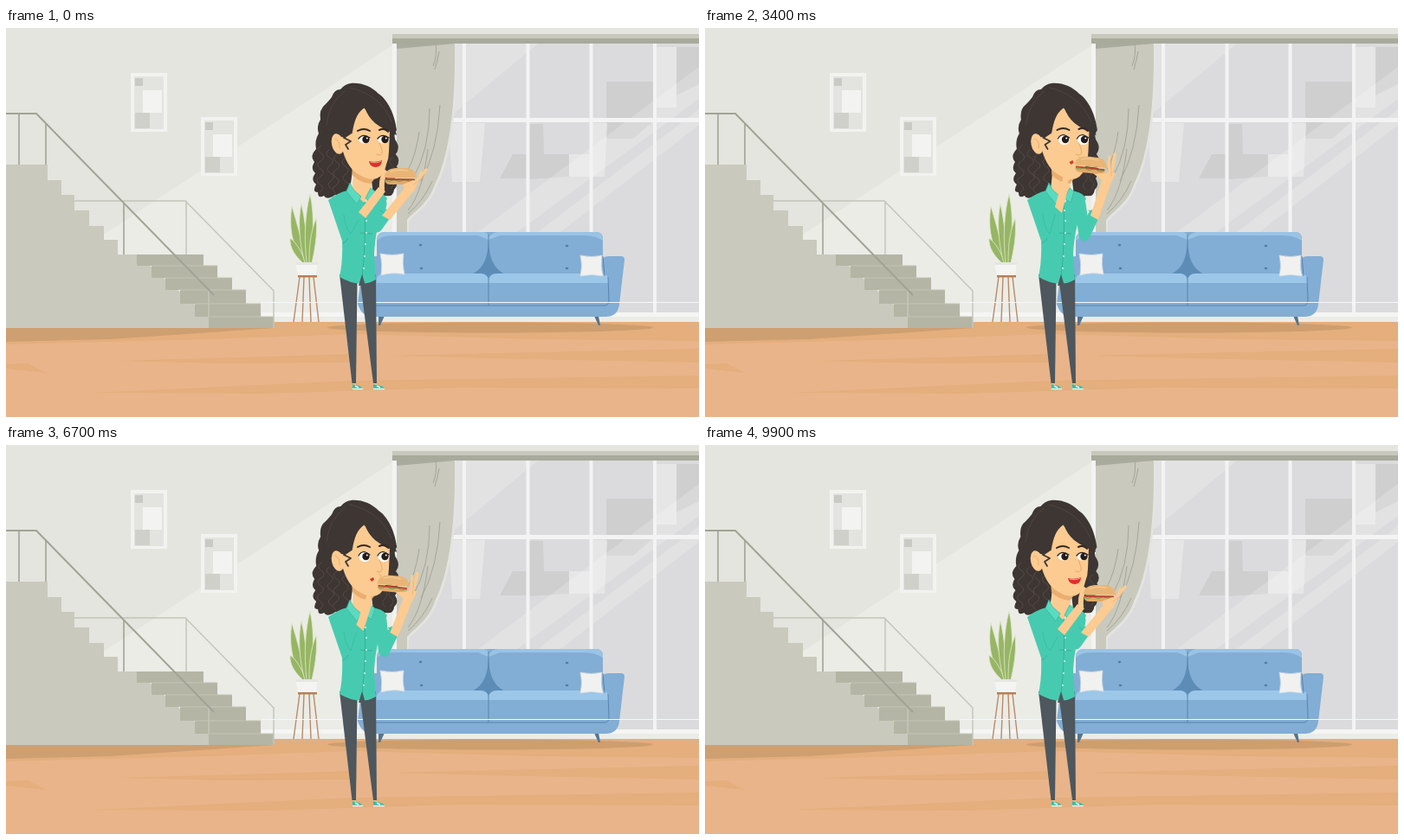
These frames come from a looping animation (800 px wide and 450 px high, 10000 ms). An HTML page:

```html
<!DOCTYPE html>
<html lang="en">
<head>
<meta charset="utf-8">
<title>Lunch at home</title>
<style>
html,body{margin:0;width:100%;height:100%;overflow:hidden;background:#e4e5de}
svg{display:block;width:100vw;height:100vh}
</style>
</head>
<body>
<svg viewBox="0 0 800 450">
  <defs>
    <g id="picture">
      <path fill="#f2f3f0" d="M0 0h42v68h-42z"/><path fill="#e3e4df" d="M4 4h34v61h-34z"/>
      <path fill="#c9cac4" d="M5 6h9v9h-9z"/><path fill="#cfd0ca" d="M5 46h17v18h-17z"/>
      <path fill="#f3f4f1" d="M14 20h22v26h-22z"/>
    </g>
    <clipPath id="glass"><path d="M451 18H800V329H451z"/></clipPath>
  </defs>

  <!-- wall -->
  <path fill="#e4e5de" d="M0 0H800V345H0z"/>
  <path fill="#ebece6" d="M446 20V345H0V313z"/>
  <use href="#picture" x="144" y="52"/><use href="#picture" x="225" y="103"/>

  <!-- window -->
  <g clip-path="url(#glass)">
    <path fill="#dbdbdd" d="M451 18H800V329H451z"/>
    <path fill="#cfcfd0" d="M693 62h54v46l-23 20h-31zM774 22h26v43l-26 13zM603 111h17l1 35h29v26l-47 3zM585 146h25v28h-40z"/>
    <path fill="#e6e6e7" d="M511 110h42l-6 68h-32zM677 110h17l-3 62h-41v-26h27zM750 22h24v70h-23z"/>
    <g fill="#fff" opacity=".2">
      <path d="M518 18H614L518 98z"/><path d="M800 45V82L590 236H545z"/><path d="M800 94V112L640 236H614z"/>
    </g>
  </g>
  <g stroke="#f3f3f3" fill="none">
    <path stroke-width="4" d="M529 18V330M602.500 18V330M675.500 18V330M749 18V330"/>
    <path stroke-width="5" d="M451 106.500H800M448.500 18V236"/>
  </g>
  <path fill="#ebece8" d="M295 317H700V341H295zM700 329H800V341H700z"/>
  <path fill="#f5f5f4" d="M295 329h505v5h-505z"/>

  <!-- curtain -->
  <path fill="#e4e4df" d="M451 18H520C521 85 516 145 498 181C490 205 474 213 465 224V236H451z"/>
  <path fill="#c9cabd" d="M451 18H518C519 85 513 145 495 181C488 203 470 213 463 222V236H451z"/>
  <path fill="#a9ab9e" d="M451 18H518L451 24z"/>
  <path stroke="#a4a698" fill="none" d="M496 18Q498 32 493 44M500 27Q498 38 495 48M489 93Q489 140 470 174M501 89Q498 143 479 177M477 120Q473 148 464 164M487 140Q481 190 464 211M492 177Q482 200 464 215"/>
  <path fill="#c8c9bc" d="M446 7H800V12H446z"/><path fill="#a8aa9c" d="M446 12H800V18H446z"/>

  <!-- floor -->
  <path fill="#e9b489" d="M0 340H800V450H0z"/>
  <g fill="#e4ae7d">
    <path d="M0 347L330 340H800V362L610 360L400 354L235 360L0 366z"/>
    <path d="M0 389L25 388L46 399L0 394zM130 385L405 377V387L250 388z"/>
    <path d="M440 379L800 371V387L600 383zM100 422L400 408L800 402V417L520 416L300 423z"/>
  </g>
  <path fill="#ce9f70" d="M0 347H310L120 360L0 363z"/>
  <ellipse fill="#ce9e6f" cx="559" cy="346.500" rx="188" ry="6"/>

  <!-- stairs -->
  <path fill="#c9cabd" d="M0 158H48V176H64V193H79V211H96V229H113V245H129V262H151L234 334V347H0z"/>
  <path fill="#b4b5a4" d="M151 262H228V275H244V289H261V303H277V319H294V334H309V347H234V334H218V319H201V303H184V289H168V275H151z"/>
  <path stroke="#c3c4b5" fill="none" d="M168 275H244M184 289H261M201 303H277M218 319H294M234 334H309"/>
  <path stroke="#c4c6ba" stroke-width="1.500" fill="none" d="M79 200H207L309 304V347M208 200V262M234 303V334"/>
  <path stroke="#a1a396" stroke-width="2" fill="none" d="M0 99H35L240 309"/>
  <path stroke="#a1a396" stroke-width="1.600" d="M15 99V158M46 110V158M136 203V262"/>

  <!-- plant -->
  <path stroke="#b98a68" stroke-width="1.400" fill="none" d="M339 288L332 340M344 288L342 340M350 288L352 340M355 288L361 340"/>
  <path fill="#b98055" d="M337 286h22v2.500h-22z"/>
  <g fill="#96b665" stroke="#e2e9cd" stroke-width=".8">
    <path d="M344 272C331 254 326 232 330 206C336 226 342 248 347 272z"/>
    <path d="M343 272C334 264 327 254 328 243C336 249 342 260 346 272z"/>
    <path d="M345 272C338 246 337 222 341 203C346 226 348 250 348 272z"/>
    <path d="M347 272C344 240 345 216 351 192C357 220 354 246 351 272z"/>
    <path d="M350 272C350 254 351 238 358 220C360 240 356 258 353 272z"/>
  </g>
  <path fill="#f4f4f2" d="M334 271H360L358 286H337z"/><path fill="#e5e6e2" d="M334 271H360V274H334z"/>

  <!-- sofa -->
  <path fill="#55748c" d="M430 333h7l-5 11h-2zM679 333h5l2 11h-2z"/>
  <path fill="#82add4" d="M428 244Q429 236 437 236H681Q689 236 689 244V267Q690 264 697 264H710Q714 264 714 268L708 320Q706 334 692 334H422Q410 333 406 319L412 270Q413 264 428 264z"/>
  <path fill="#9ac3e5" d="M428 246Q429 236 437 236H552Q557 237 557 242Q562 236 568 236H681Q689 236 689 246Q680 240 668 240H570L557 245L545 240H446Q434 240 428 246z"/>
  <path fill="#5d8db7" d="M557 242C557 266 563 280 579 286L557 293L535 286C551 280 557 266 557 242z"/>
  <path fill="#9cc7e9" d="M428 290Q429 284 438 284H549Q556 285 557 291Q559 284 566 284H687Q695 284 695 290V296H428z"/>
  <path fill="#82add4" d="M428 295H695V321H428z"/>
  <path stroke="#5685ae" fill="none" d="M557 290V321M420 321H691Q696 321 696 315L695 288M557 239V260M689 264L691 287"/>
  <path stroke="#517fa8" stroke-width="2.500" stroke-linecap="round" d="M478 251h1M479 278h1M647 252h1M647 278h1"/>
  <g fill="#f1f1ef" stroke="#d6dde4" stroke-width=".7">
    <path d="M432 261Q446 264 459 261Q457 273 460 285Q446 282 433 286Q435 273 432 261z"/>
    <path d="M663 263Q676 266 688 263Q686 275 689 287Q676 284 663 287Q666 275 663 263z"/>
  </g>
  <path stroke="#f4f8fa" d="M295 317.500H800"/>

  <!-- woman -->
  <g id="hair"></g>
  <path fill="#4d575d" d="M385 285H427L428 411H424L409 294H405.500L404 411H399.500z"/>
  <path fill="#f2c592" d="M400 411h4v3h-4zM424 411h4v3h-4z"/>
  <path fill="#35bda5" d="M400 412L408 414Q412 416 411 418H400zM424 412L433 414Q438 416 437 418H424z"/>
  <path stroke="#e8f3ef" stroke-width="1.500" d="M400 417.500h12M424 417.500h13M403 414l4 2M428 414l4 2"/>
  <path fill="#fccb91" d="M401 160H421L422 190L413 203L400 190z"/>
  <path fill="#47cbb0" d="M394 188L407 194L416 202L421 188Q435 189 440 197L431 223Q426 240 425 262L427 291Q409 302 385 288Q389 270 388 246L372 199Q382 191 394 188z"/>
  <path fill="#fccb91" d="M401 182H421L422 190L413 202L402 191z"/>
  <path fill="#5cdac0" stroke="#34b59b" stroke-width=".7" d="M397 179L393 189L405 204L410 195L401 187zM421 185L415 197L422 202L426 189z"/>
  <path stroke="#31ae95" stroke-width=".9" fill="none" d="M414 202Q416 244 411 289M389 249Q394 247 397 238M409 237l14 1"/>
  <path stroke="#d4f5ed" stroke-width="2" stroke-linecap="round" d="M415 211v.1M416 223v.1M416 237v.1M415 250v.1M414 264v.1M413 278v.1"/>
  <path fill="#4d575d" d="M411 285L415 298H407z"/>
  <g id="head"></g>
  <g id="arms"></g>
</svg>
<script>
const LOOP = 10000, STEP = 100;
const SKIN = '#fccb91', SHADE = '#eaae70', HAIR = '#3d3633', STRAND = '#594b43', SHIRT = '#47cbb0';
const hair = document.getElementById('hair');
const head = document.getElementById('head');
const arms = document.getElementById('arms');

const path = (d, fill) => `<path d="${d}" fill="${fill}"/>`;
const line = (d, color, width) =>
  `<path d="${d}" fill="none" stroke="${color}" stroke-width="${width}" stroke-linecap="round" stroke-linejoin="round"/>`;
const mix = (a, b, k) => a + (b - a) * k;
const point = (a, b, k) => a.map((v, i) => mix(v, b[i], k));

// Eased interpolation through [time, value] keys.
function track(keys, t) {
  const i = keys.findIndex(key => key[0] > t);
  if (i < 0) return keys[keys.length - 1][1];
  const [t0, v0] = keys[i - 1], [t1, v1] = keys[i], k = (t - t0) / (t1 - t0);
  return mix(v0, v1, k * k * (3 - 2 * k));
}

const bites = [[0, 0], [900, 0], [1700, 1], [3600, 1], [4300, 0], [4900, 0], [5600, 1], [6500, 1], [7300, 0]];
const leans = [[0, 0], [700, 0], [1200, 3], [2200, 2], [3400, .5], [4400, 0]];
const sways = [[0, 0], [1200, 0], [2400, 1.5], [3400, 2], [4500, 0], [6000, 0], [8000, 1], [9900, 2]];

// A vertical curl swinging from side to side.
function curl(x, y, bottom, size, lean) {
  let d = `M${x} ${y}`;
  for (let side = -1; y < bottom; side = -side) {
    d += `q${side * size + lean} 4 ${lean} 9`;
    y += 9;
  }
  return d;
}

function drawHair(lean, sway) {
  hair.setAttribute('transform', `translate(${lean + sway * .7})`);
  let art = path('M398 64C411 63 422 68 430 76C441 83 449 101 451 118Q446 125 451 132Q455 139 450 146'
    + 'Q456 153 451 160Q455 167 449 174Q454 182 448 187Q447 196 438 194Q431 198 424 193L420 160L400 165L397 187'
    + 'Q388 194 380 193Q370 200 367 194Q360 198 360 190Q353 190 358 181Q351 176 357 168Q351 163 356 155'
    + 'Q350 148 358 140Q356 130 361 122Q358 114 363 106Q361 94 369 88Q373 84 376 80Q379 71 386 71Q391 65 398 64z', HAIR);
  for (let i = 0; i < 4; i++) art += line(curl(364 + i * 9, 136 + i * 5, 184, 7, i % 2 ? .5 : -.3), STRAND, 1);
  art += line(curl(446, 150, 184, 6, -.5) + curl(437, 160, 185, 5, 0), STRAND, .9);
  hair.innerHTML = art;
}

function drawEye(x, y, blink, wide) {
  if (blink) {
    return path(`M${x - 7} ${y - 3}q7 -4 13 0v4q-7 4 -13 0z`, '#e3b96d')
      + line(`M${x - 7} ${y + 1}q7 5 13 0M${x + 5} ${y + 2}l2 -1`, '#35251f', 1.5);
  }
  const height = wide ? 6.2 : 4.6;
  return `<ellipse cx="${x}" cy="${y}" rx="6.500" ry="${height}" fill="#fff"/>`
    + `<circle cx="${x + 1.5}" cy="${y}" r="4.200" fill="#241b19"/>`
    + `<circle cx="${x + 2.8}" cy="${y - 1.5}" r="1" fill="#fff"/>`
    + line(`M${x - 7} ${y - 1}q5 ${-height - 2} 13 -1`, '#30221d', 1.3);
}

function drawMouth(bite, smile) {
  if (bite > .6) return path('M420 155l4 -2 1 3 -3 2z', '#d8342b') + line('M431 149q4 4 1 9', SHADE, 1);
  if (smile) return path('M419 154Q427 156 434 153Q434 160 427 161Q420 161 419 154z', '#dc3029')
    + line('M421 155Q428 157 433 154', '#f3aaa0', 1);
  return path('M420 155Q423 152 426 154Q430 152 432 154Q432 162 426 163Q420 161 420 155z', '#e0443c')
    + line('M422 156h8', '#8d2a26', 1);
}

function drawHead(t, bite, lean) {
  head.setAttribute('transform', `translate(${lean})`);
  const blink = t >= 7900 && t < 8200;
  const wide = !blink && t >= 900 && t < 9900;
  const smile = t < 900 || t >= 7400;
  const browY = wide ? 117 : 118;
  head.innerHTML =
    path('M399 160Q411 174 425 175L421 180Q408 179 400 170z', SHADE)
    + path('M412 91Q395 103 387 126L389 143Q395 163 408 170Q420 177 428 174Q437 170 439 158Q442 151 442 143L443 119Q430 111 412 91z', SKIN)
    + path('M384 125C383 104 392 78 414 80C432 82 446 96 451 124C443 120 432 115 426 110Q418 103 414 92'
      + 'C405 98 402 108 400 120L391 127z', HAIR)
    + `<ellipse cx="383" cy="134" rx="7" ry="12" fill="${SKIN}" transform="rotate(-12 383 134)"/>`
    + line('M380 128q6 2 5 11', SHADE, 1)
    + line('M399 121L390 127L398 131L392 135L395 140', HAIR, 1.8)
    + line('M397 69Q432 77 445 108M391 73Q373 86 370 112', STRAND, .7)
    + drawEye(414, 129, blink, wide) + drawEye(436, 129, blink, wide)
    + line(`M406 ${browY + 1}q7 -4 14 0M431 ${browY}q6 -3 10 2`, '#352821', 2)
    + line('M431 133Q435 142 434 145Q432 148 428 146', SHADE, 1.2)
    + drawMouth(bite, smile);
}

function drawBurger(x, y, angle) {
  return `<g transform="translate(${x} ${y}) rotate(${angle})">`
    + path('M-17 3H17Q18 9 11 9H-11Q-18 9 -17 3z', '#e2a868')
    + line('M-16 4.500q3 2 6 0t6 0 6 0 6 0 8 0', '#7fa154', 1.4)
    + line('M-16 3L16 3.500', '#b9452f', 1.8)
    + line('M-15 1L16 1.500', '#f0d08d', 1)
    + path('M-18 1Q-18 -9 -5 -10H8Q18 -9 19 1z', '#e9b577')
    + line('M-11 -6Q-3 -9 8 -7', '#f2c891', 1.5)
    + '</g>';
}

function drawArms(bite) {
  const [cx, cy] = point([411, 215], [408, 209], bite);
  const [hx, hy] = point([434, 187], [416, 180], bite);
  const [ex, ey] = point([428, 230], [438, 240], bite);
  const [sx, sy] = point([438, 216], [449, 216], bite);
  const [rx, ry] = point([466, 184], [464, 174], bite);
  const [bx, by] = point([455, 172], [445, 159], bite);
  const [fx, fy] = point([485, 164], [473, 146], bite);
  arms.innerHTML =
    line(`M433 203L${ex} ${ey}L${sx} ${sy}`, SHIRT, 13)
    + line(`M${sx - 6} ${sy - 5}l12 8`, '#37bba1', 1)
    + path(`M${sx - 4} ${sy + 1}L${rx - 5} ${ry}L${rx + 5} ${ry + 4}L${sx + 5} ${sy + 6}z`, SKIN)
    + line(`M384 204L397 237L${cx - 4} ${cy + 2}`, SHIRT, 13)
    + line(`M390 216Q392 233 398 238L${cx - 4} ${cy + 7}`, '#37bba1', .8)
    + path(`M${cx - 4} ${cy - 2}L${hx - 4} ${hy - 3}L${hx + 4} ${hy + 2}L${cx + 4} ${cy + 5}z`, SKIN)
    + line(`M${hx} ${hy}Q${hx - 1} ${hy - 10} ${hx + 3} ${hy - mix(20, 7, bite)}`, SKIN, 6)
    + line(`M${rx} ${ry}Q${rx + 6} ${ry - 3} ${fx} ${fy}`, SKIN, 3.500)
    + drawBurger(bx, by, mix(0, 6, bite))
    + path(`M${rx - 6} ${ry + 2}L${bx + 3} ${by + 9}Q${rx - 3} ${ry - 5} ${rx + 4} ${ry - 8}L${rx + 10} ${ry - 6}L${rx + 5} ${ry + 5}z`, SKIN)
    + line(`M${rx + 4} ${ry - 4}Q${fx - 8} ${fy + 13} ${fx - 6} ${fy + 3}`, SKIN, 3)
    + line(`M${rx + 5} ${ry - 3}L${fx - 4} ${fy + 9}`, SHADE, .7);
}

function render(now) {
  const t = Math.floor(now % LOOP / STEP) * STEP;
  const bite = track(bites, t), lean = track(leans, t);
  drawHair(lean, track(sways, t));
  drawHead(t, bite, lean);
  drawArms(bite);
}

let start;
function tick(now) {
  start ??= now;
  render(Math.max(0, now - start));
  requestAnimationFrame(tick);
}
render(0);
requestAnimationFrame(tick);
</script>
</body>
</html>
```
